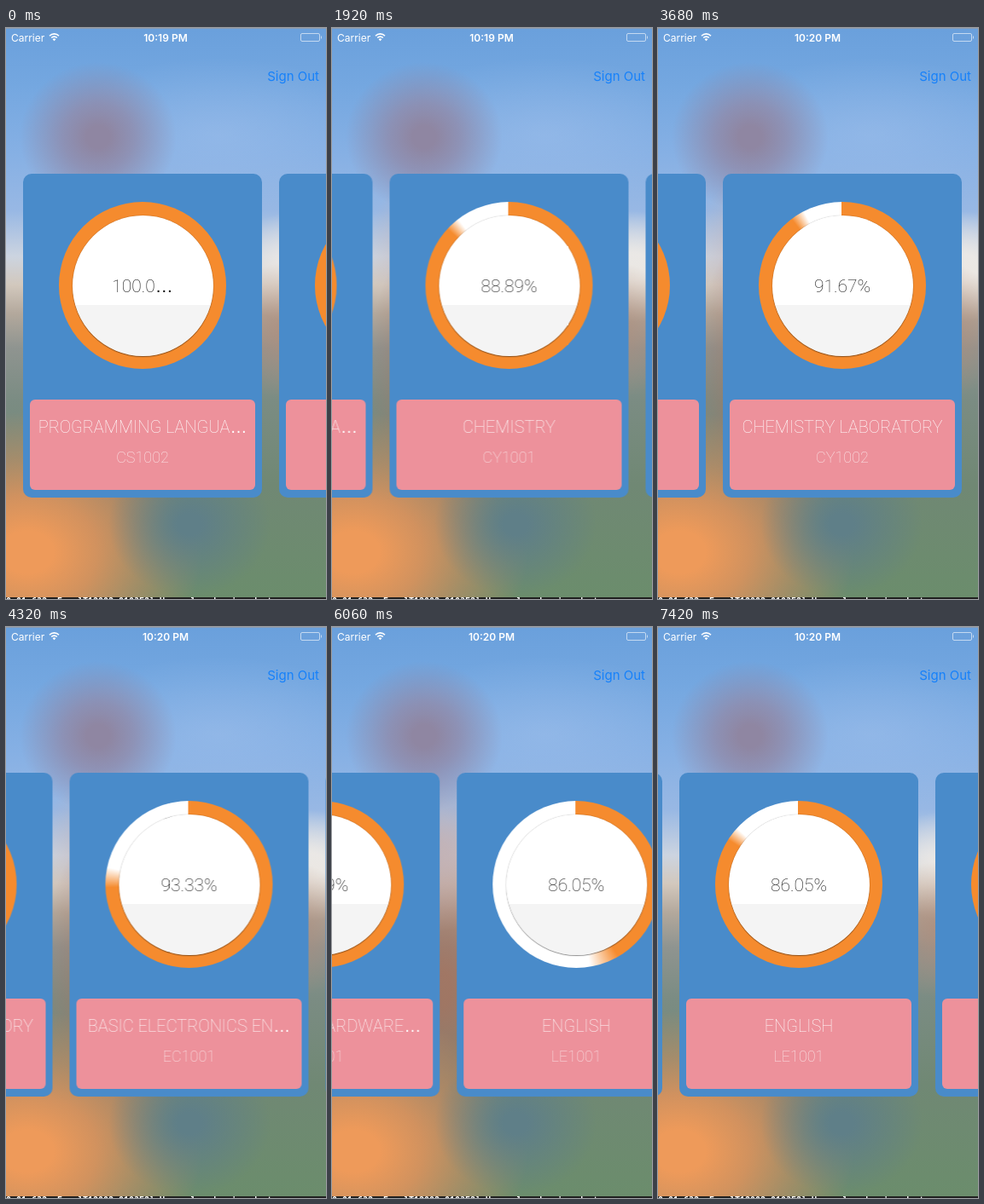
An HTML page for the animation above (7.44 s loop, 375 by 670 pixels).

```html
<!DOCTYPE html>
<html lang="en">
<head>
<meta charset="utf-8">
<title>Attendance cards</title>
<style>
@property --head { syntax: "<angle>"; inherits: false; initial-value: 0deg; }
@property --fade { syntax: "<angle>"; inherits: false; initial-value: 10deg; }

html, body { margin: 0; width: 100%; height: 100%; overflow: hidden; }
body { --loop: 7440ms; font-family: Inter, sans-serif; color: #fff; }

#stage {
  position: relative; width: 375px; height: 670px; overflow: hidden;
  background:
    radial-gradient(ellipse 92px 88px at 108px 128px, #8f86a2 0 15%, #8f8aaacc 45%, #8f8aaa00),
    radial-gradient(ellipse 95px 85px at 215px 582px, #5f7f88 15%, #5f7f8800),
    radial-gradient(ellipse 205px 165px at 25px 615px, #ee9a5a 15%, #e0935cdd 40%, #c98f6299 65%, #c98f6200),
    radial-gradient(ellipse 85px 95px at 125px 262px, #c3b0b3cc 10%, #c3b0b300),
    radial-gradient(ellipse 90px 200px at 130px 425px, #a5735fdd 10%, #a5735f00),
    radial-gradient(ellipse 80px 80px at 330px 355px, #b08d7bcc, #b08d7b00),
    radial-gradient(ellipse 100px 65px at 350px 280px, #efebe6dd 25%, #efebe600),
    radial-gradient(ellipse 190px 90px at 250px 125px, #9bbdea99, #9bbdea00),
    linear-gradient(#6aa0dc, #74a7e0 10%, #86b0e4 22%, #98b8e4 32%, #ccd4e0 40%,
      #d2c8bd 45%, #b3a89c 50%, #8f9490 56%, #7b8c83 65%, #708874 80%, #6b8d6c);
}
#stage > * { position: absolute; }

.rim { top: 0; width: 100%; height: 1px; background: #8a9db4; }
.carrier, .clock { top: 4px; font-size: 12px; line-height: 15px; white-space: nowrap; }
.carrier { left: 6px; }
.clock { left: 0; width: 374px; text-align: center; font-weight: 600; }
.before { animation: before var(--loop) step-end infinite; }
.after { animation: after var(--loop) step-end infinite; }
@keyframes before { 0% { opacity: 1 } 32.26%, 100% { opacity: 0 } }
@keyframes after { 0% { opacity: 0 } 32.26%, 100% { opacity: 1 } }
.icons { left: 0; top: 0; }
.signout { right: 8px; top: 47px; font-size: 15px; line-height: 19px; color: #1681fa; white-space: nowrap; }
.log {
  left: 0; bottom: 0; width: 100%; height: 2px; overflow: hidden; background: #202020;
  font: 700 10px/10px "Noto Sans Mono", monospace; white-space: nowrap;
}
.log span { position: relative; top: -1px; }

#track { left: 0; top: 170.5px; animation: scroll var(--loop) linear infinite; }
@keyframes scroll {
  0% { transform: translateX(0) }
  17.204% { transform: translateX(0); animation-timing-function: cubic-bezier(.35, .1, .6, .88) }
  25.806% { transform: translateX(-252.5px) }
  26.344% { transform: translateX(-252.5px); animation-timing-function: cubic-bezier(.25, .45, .4, 1) }
  36.29% { transform: translateX(-300px) }
  40.86% { transform: translateX(-300px); animation-timing-function: ease-in }
  41.935% { transform: translateX(-314px) }
  43.28% { transform: translateX(-314px); animation-timing-function: cubic-bezier(.3, .1, .6, .85) }
  49.73% { transform: translateX(-548px); animation-timing-function: cubic-bezier(.3, .2, .6, .88) }
  58.065% { transform: translateX(-845.5px) }
  58.602% { transform: translateX(-845.5px); animation-timing-function: cubic-bezier(.25, .45, .4, 1) }
  63.44% { transform: translateX(-900px); animation-timing-function: cubic-bezier(.3, .1, .35, 1) }
  73.92% { transform: translateX(-1200px) }
  75.538% { transform: translateX(-1201.5px) }
  76.882% { transform: translateX(-1201.5px); animation-timing-function: cubic-bezier(.4, 0, .7, .82) }
  81.452% { transform: translateX(-1373.5px); animation-timing-function: cubic-bezier(.15, .5, .4, .98) }
  99.731%, 100% { transform: translateX(-1495px) }
}

.card {
  position: absolute; top: 0; width: 280px; height: 380px; border-radius: 10px;
  background: #498bca; font-family: Roboto, sans-serif; text-align: center; white-space: nowrap;
}
.card > * { position: absolute; }
.ring {
  left: 42px; top: 33.5px; width: 196px; height: 196px; border-radius: 50%;
  --head: var(--end);
  background: conic-gradient(from -.4deg, #f58b2e calc(var(--head) - var(--fade)), #fff var(--head));
}
.ring.fill { animation: fill var(--loop) linear var(--start) infinite backwards; }
@keyframes fill {
  0% { --head: 0deg; --fade: 34deg }
  10.35%, 100% { --head: var(--end); --fade: 10deg }
}
.dial {
  left: 57.5px; top: 49px; width: 165px; height: 165px; border-radius: 50%;
  background: linear-gradient(#fff 104.5px, #f4f4f4 104.5px);
  box-shadow: 0 0 1px #0008, 0 1px 1px #0006;
}
.pct { left: 0; width: 280px; top: 120.5px; font-size: 21px; line-height: 24px; font-weight: 200; color: #111; }
.panel { left: 8px; top: 265.7px; width: 264px; height: 106px; border-radius: 6px; background: #ed919b; }
.title { left: 0; width: 280px; top: 285.5px; font-size: 20px; line-height: 24px; font-weight: 200; }
.code { left: 0; width: 280px; top: 321.5px; font-size: 18px; line-height: 24px; font-weight: 100; color: #fffc; }
.dots { font-family: "Liberation Sans", sans-serif; }
</style>
</head>
<body>
<div id="stage">
  <div class="rim"></div>
  <div class="carrier">Carrier</div>
  <div class="clock before">10:19 PM</div>
  <div class="clock after">10:20 PM</div>
  <svg class="icons" width="375" height="22" fill="none" stroke="#fff">
    <path d="M51 9.2a7.6 7.6 0 0 1 11 0M53.2 11.5a4.6 4.6 0 0 1 6.6 0" stroke-width="1.6"/>
    <path d="M56.5 15.2l-1.9-2a2.7 2.7 0 0 1 3.8 0z" fill="#fff" stroke="none"/>
    <rect x="345.5" y="6.5" width="22" height="9" rx="1.5" opacity=".6"/>
    <path d="M369.5 9.5v3" opacity=".6"/>
  </svg>
  <div class="signout">Sign Out</div>
  <div id="track"></div>
  <div class="log"><span>0.01 632 sFapplT12002:0103F2] User already signed ot</span></div>
</div>
<script>
// title, code, percent, label, ring start in ms (none: already filled)
const courses = [
  ["PROGRAMMING LANGUA…", "CS1002", 100, "100.0…"],
  ["CHEMISTRY", "CY1001", 88.89],
  ["CHEMISTRY LABORATORY", "CY1002", 91.67, "", 1900],
  ["BASIC ELECTRONICS EN…", "EC1001", 93.33, "", 3680],
  ["COMPUTER HARDWARE…", "IT1001", 86.79, "", 4330],
  ["ENGLISH", "LE1001", 86.05, "", 5640],
  ["MATHEMATICS", "MA1001", 88.1, "", 6450]
];

const clip = text => text.replace("…", '<span class="dots">…</span>');

const card = ([title, code, pct, label, start], i) => {
  const end = pct === 100 ? 372 : pct * 3.6 + 3;
  return `<div class="card" style="left:${20 + 300 * i}px">
    <div class="ring ${start ? "fill" : ""}" style="--end:${end}deg;--start:${start || 0}ms"></div>
    <div class="dial"></div>
    <div class="pct">${clip(label || pct.toFixed(2) + "%")}</div>
    <div class="panel"></div>
    <div class="title">${clip(title)}</div>
    <div class="code">${code}</div>
  </div>`;
};

document.getElementById("track").innerHTML = courses.map(card).join("");
</script>
</body>
</html>
```
